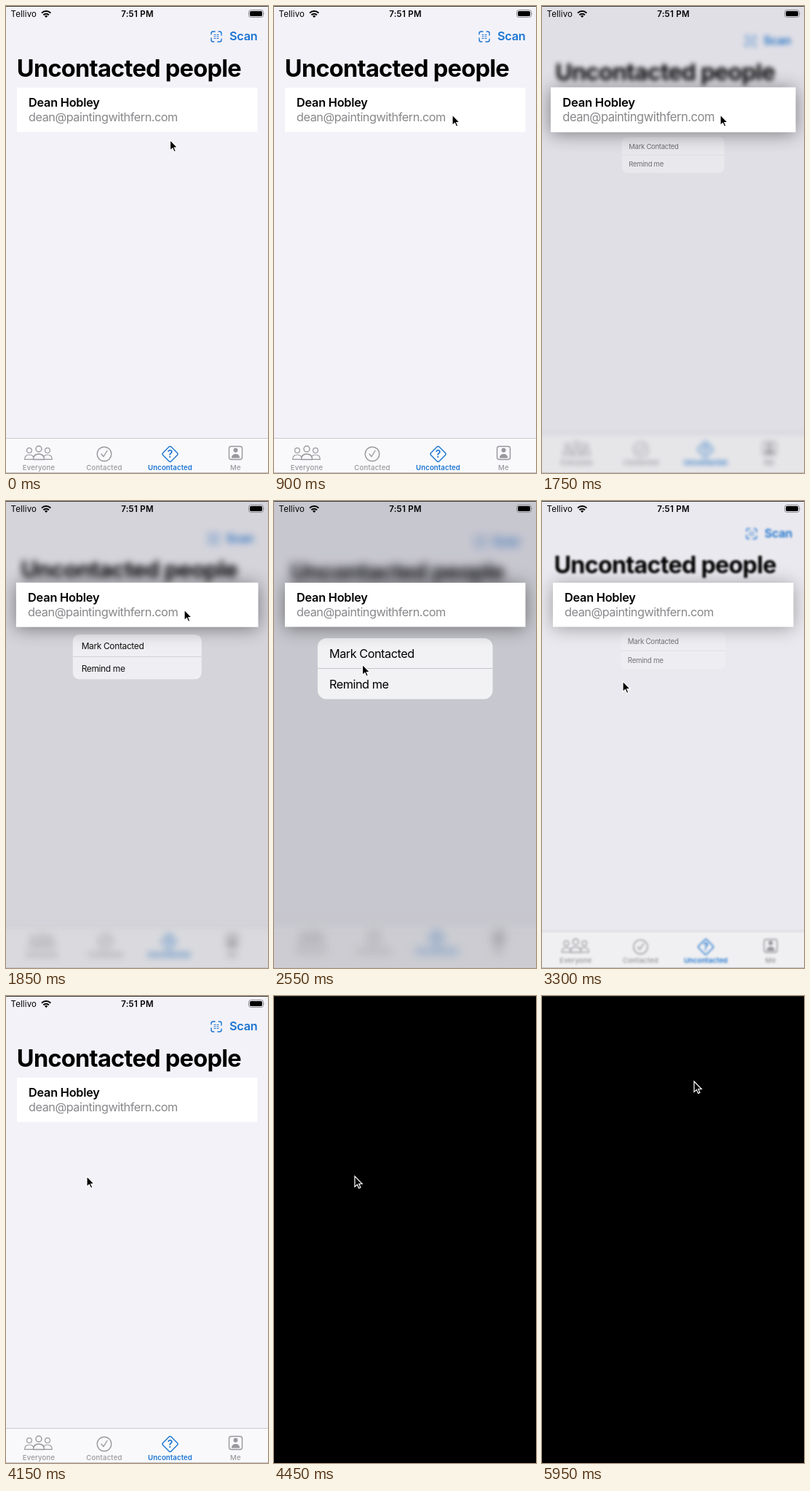
These frames come from a looping animation (360 by 640 pixels, 8000 ms). An HTML page:

```html
<!DOCTYPE html>
<html lang="en">
<head>
<meta charset="utf-8">
<title>Context menu</title>
<style>
  html, body { margin: 0; width: 100%; height: 100%; overflow: hidden; background: #f3f2f8; }
  svg { display: block; }
  text { font-family: Inter, Roboto, sans-serif; font-size: 16.3px; letter-spacing: -.03em; }
  .title { font-size: 32.6px; font-weight: 700; letter-spacing: -.023em; }
  .strong { font-weight: 600; letter-spacing: -.015em; }
  .status { font-size: 11.5px; letter-spacing: .01em; }
  .time { font-weight: 600; letter-spacing: .025em; text-anchor: middle; }
  .blue { color: #1a74d2; }
  .tab { color: #98989d; }
  .tab.on { color: #1a74d2; }
  .tab text { font-size: 9.6px; font-weight: 500; letter-spacing: .02em; text-anchor: middle; fill: currentColor; stroke: none; }
  .tab.on text { font-weight: 600; letter-spacing: .01em; }
  .tab, .line { fill: none; stroke: currentColor; stroke-width: 1.4; stroke-linecap: round; stroke-linejoin: round; }
  .solid { fill: currentColor; stroke: none; }
</style>
</head>
<body>
<svg width="360" height="640" viewBox="0 0 360 640">
  <defs>
    <g id="person">
      <circle cy="-10.500" r="4"/>
      <path d="M-7.500 4c0-5 3-7.500 7.500-7.500s7.500 2.500 7.500 7.500z"/>
    </g>
  </defs>
  <rect width="360" height="640" fill="#f3f2f8"/>
  <g id="page">
    <g class="blue">
      <rect class="line" x="282" y="35" width="14" height="14" rx="2.500" pathLength="4" stroke-dasharray=".6 .4" stroke-dashoffset=".4"/>
      <path class="line" d="M286 39.500h6M286 42h6M286 44.500h6" style="stroke-width: 1; stroke-dasharray: 2 2"/>
      <text class="strong" x="307" y="47" fill="currentColor">Scan</text>
    </g>
    <text class="title" x="14.800" y="97">Uncontacted people</text>

    <rect x="-60" y="593" width="480" height="110" fill="#f9f9fb"/>
    <path d="M-60 592.500H420" stroke="#c9c9ce"/>
    <g class="tab" transform="translate(45 614)">
      <use href="#person" transform="translate(-13 4) scale(.85)"/>
      <use href="#person" transform="translate(12 4) scale(.85)"/>
      <use href="#person" y="3.500" fill="#f9f9fb"/>
      <text y="22">Everyone</text>
    </g>
    <g class="tab" transform="translate(135 614)">
      <circle r="9.800"/>
      <path d="M-4 0l3 3.500 5-8"/>
      <text y="22">Contacted</text>
    </g>
    <g class="tab on" transform="translate(225.500 614)">
      <rect x="-8" y="-8" width="16" height="16" rx="2" transform="rotate(45)"/>
      <text y="5" style="font-size: 14px">?</text>
      <text y="22">Uncontacted</text>
    </g>
    <g class="tab" transform="translate(315.500 614)">
      <rect x="-9" y="-10.500" width="18" height="18" rx="3"/>
      <use href="#person" class="solid" transform="translate(0 2.500) scale(.75)"/>
      <text y="22">Me</text>
    </g>
  </g>
  <rect id="dim" width="360" height="640" fill="#000016"/>

  <g id="menu">
    <rect x="60" y="188" width="240.500" height="83.500" rx="12" fill="#f2f2f5"/>
    <path d="M60 229.500H300.500" stroke="#c6c6cb"/>
    <text x="76" y="215">Mark Contacted</text>
    <text x="76" y="257">Remind me</text>
  </g>
  <g id="card">
    <rect x="15" y="112" width="330.500" height="60.500" fill="#fff"/>
    <text class="strong" x="31" y="138">Dean Hobley</text>
    <text x="31" y="158" fill="#88888b">dean@paintingwithfern.com</text>
  </g>

  <text class="status" x="6.500" y="15">Tellivo</text>
  <g fill="none" stroke="#000" stroke-width="2">
    <path d="M49 9.600a8.800 8.800 0 0 1 12.400 0M51.400 12.200a5.400 5.400 0 0 1 7.600 0"/>
    <path d="M55.200 16l-2.200-2.300a3.200 3.200 0 0 1 4.400 0z" fill="#000" stroke="none"/>
  </g>
  <text class="status time" x="180.500" y="15">7:51 PM</text>
  <rect x="333.500" y="5.500" width="20" height="10" rx="3" fill="none" stroke="#8a8a8e"/>
  <rect x="335" y="7" width="17" height="7" rx="1.700"/>
  <path d="M354.500 9q1.500 1.500 0 3z" fill="#8a8a8e"/>
  <path d="M0 639.500H360" stroke="#c4c4c8"/>

  <rect id="black" width="360" height="640"/>
  <path id="edge" d="M0 .5H360"/>
  <path id="cursor" d="M0 0V14.500L3.400 11.400 5.600 16.400 7.900 15.400 5.800 10.500H10.200Z" stroke="#fff" stroke-width="1.200"/>
</svg>
<script>
const LOOP = 8000, STEP = 50, PRESS = 1350, BLACKOUT = 4450;
const [page, dim, menu, card, black, edge, cursor] =
  ['page', 'dim', 'menu', 'card', 'black', 'edge', 'cursor'].map(id => document.getElementById(id));

// Pointer glides: start, end, and where each one arrives.
const home = { x: 225.5, y: 183.5 };
const glides = [
  { from: 0, to: 550, x: 245, y: 149 },
  { from: 2300, to: 2550, x: 121.5, y: 224 },
  { from: 2550, to: 2950, x: 111, y: 247 },
  { from: 5350, to: 5950, x: 209, y: 117 }
];

function ease(t, from, to) {
  const u = Math.min(1, Math.max(0, (t - from) / (to - from)));
  return u * u * (3 - 2 * u);
}

function pointer(t) {
  return glides.reduce((p, g) => {
    const k = ease(t, g.from, g.to);
    return { x: p.x + (g.x - p.x) * k, y: p.y + (g.y - p.y) * k };
  }, home);
}

const zoom = (node, cx, cy, s) =>
  node.setAttribute('transform', `translate(${cx} ${cy}) scale(${s}) translate(${-cx} ${-cy})`);

function draw(now) {
  const t = Math.floor(now % LOOP / STEP) * STEP;
  const pressed = t >= PRESS, dark = t >= BLACKOUT;
  const closing = ease(t, 3050, 3400);

  const focus = ease(t, 1500, 2050) - closing;
  zoom(page, 180, 320, 1 - .05 * focus);
  page.style.filter = focus > 0 ? `blur(${6.5 * focus ** .8}px)` : 'none';
  dim.style.opacity = .18 * focus;

  const lift = .013 * pressed + .012 * ease(t, 1500, 1650) - .025 * ease(t, 1650, 1950);
  const shadow = .1 * pressed + .35 * ease(t, 1500, 1700) - .45 * ease(t, 3250, 3400);
  zoom(card, 180.25, 142.25, 1 + lift);
  card.style.filter = shadow > 0 ? `drop-shadow(0 2px 12px rgba(0,0,0,${shadow}))` : 'none';

  zoom(menu, 180.25, 168.7, .47 + .53 * ease(t, 1600, 2100) - .5 * closing);
  menu.style.opacity = ease(t, 1600, 1900) - ease(t, 3200, 3400);

  black.style.display = dark ? '' : 'none';
  edge.style.stroke = dark ? '#1c1c1c' : '#3a3a3c';
  const { x, y } = pointer(t);
  cursor.setAttribute('transform', `translate(${x} ${y})`);
}

let start;
function tick(now) {
  start ??= now;
  draw(now - start);
  requestAnimationFrame(tick);
}
draw(0);
requestAnimationFrame(tick);
</script>
</body>
</html>
```
